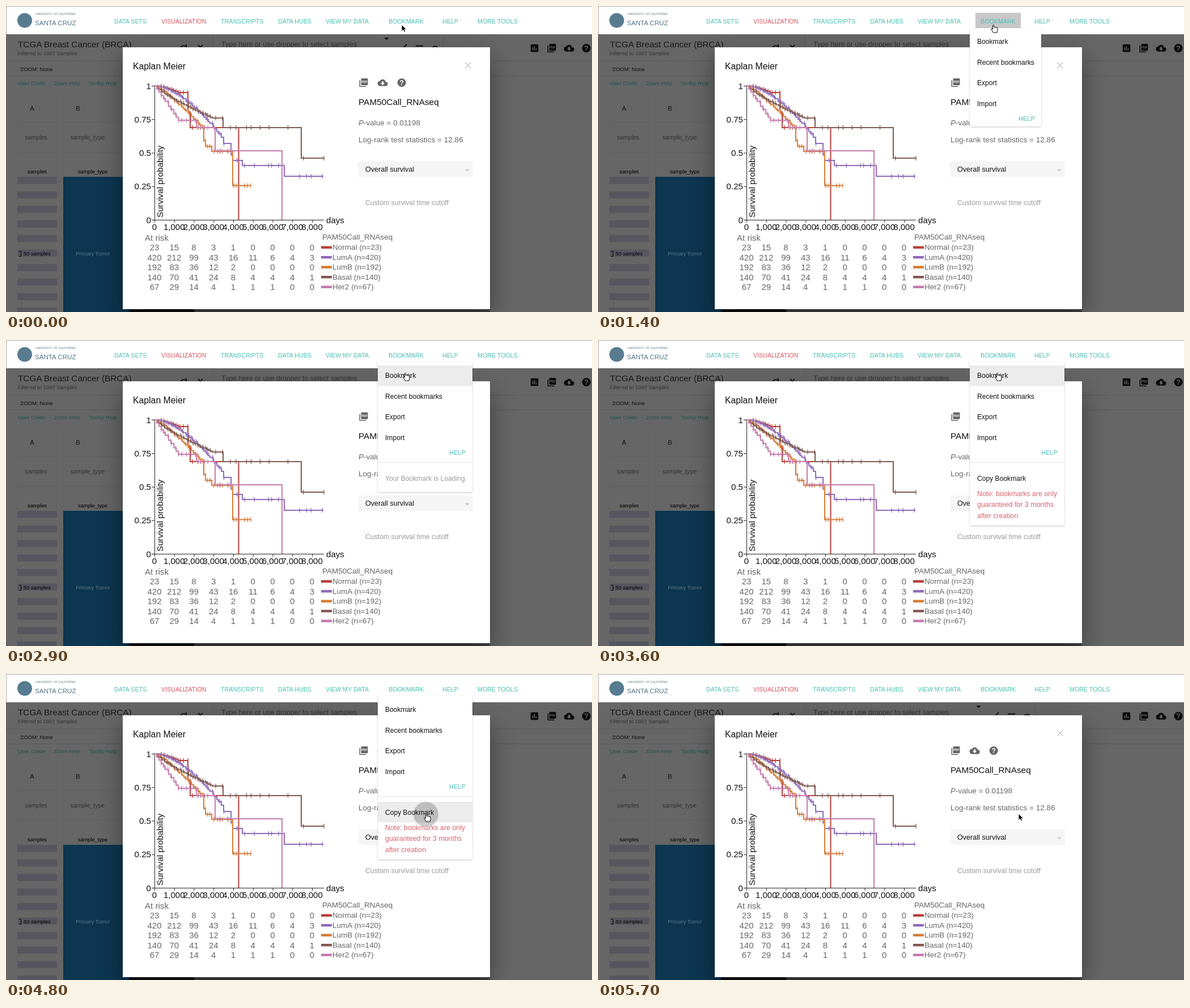
Animation, 1034 px wide and 541 px high, one loop 5800 ms. Source, as an HTML page:

```html
<!DOCTYPE html>
<html lang="en">
<head>
<meta charset="utf-8">
<title>Bookmarking a Kaplan Meier view</title>
<style>
  html, body { margin: 0; width: 100%; height: 100%; overflow: hidden; background: #fff; }
  svg { display: block; width: 1034px; height: 541px; font-family: "Liberation Sans", Arial, sans-serif; }
  #dialog { filter: drop-shadow(0 17px 20px rgba(0, 0, 0, .4)); }
  #panel { filter: drop-shadow(0 1.5px 1.5px rgba(0, 0, 0, .22)); }
</style>
</head>
<body>
<svg viewBox="0 0 1034 541">
  <g id="page"></g>
  <g id="dialog"><rect x="206" y="73" width="648" height="463" fill="#fff"/></g>
  <g id="content"></g>
  <g id="nav"></g>
  <g id="menu">
    <rect id="panel" x="656" y="39" fill="#fff"/>
    <rect id="hover" x="656" height="36.5"/>
    <circle id="ripple" cx="741" cy="248"/>
    <g id="items"></g>
    <g id="loading"></g>
    <g id="copied"></g>
  </g>
  <g id="cursor" stroke-linejoin="round">
    <path id="arrow" d="M0 0V11.5L2.7 9 4.5 13 6.7 12 4.9 8.2H8.5Z" stroke="#fff" stroke-width=".9"/>
    <path id="hand" d="M-1.5 7V1Q-.5-1 .6 1V4.4Q2 3 2.9 4.8 4 3.700 5 5.300 7 4.500 7 6.500V9.500L6 14H-.6L-4.400 7.600Q-3.500 5.800-1.500 8.200Z" fill="#fff" stroke="#000"/>
  </g>
</svg>
<script>
const $ = id => document.getElementById(id);
const TEAL = '#4bbfb3', RED = '#d25560', GRAY = '#666', DIMMED = '#666';

const range = n => [...Array(n).keys()];
const text = (x, y, str, size, fill = '#111', extra = '') =>
  `<text x="${x}" y="${y}" font-size="${size}" fill="${fill}" ${extra}>${str}</text>`;
const middle = 'text-anchor="middle"';
const rect = (x, y, w, h, fill, extra = '') =>
  `<rect x="${x}" y="${y}" width="${w}" height="${h}" fill="${fill}" ${extra}/>`;
const circle = (cx, cy, r, fill) => `<circle cx="${cx}" cy="${cy}" r="${r}" fill="${fill}"/>`;
const line = (d, stroke, width = 1) => `<path d="${d}" fill="none" stroke="${stroke}" stroke-width="${width}"/>`;

// Icons on a 24 unit grid
const icons = {
  bars: (ink, back) => rect(3, 3, 18, 18, ink, 'rx="2"') + line('M8 17V10M12 17V7M16 17V13', back, 2),
  pdf: (ink, back) => rect(6, 2, 16, 16, ink, 'rx="2"') + line('M3 6V21H18', ink, 2) +
    text(14, 12.5, 'PDF', 7, back, 'text-anchor="middle" font-weight="bold"'),
  cloud: (ink, back) => circle(6, 14, 6, ink) + circle(12, 11, 7, ink) + circle(19, 15, 5, ink) +
    rect(6, 13, 13, 7, ink) + `<path d="M10 9h4v4h3l-5 5-5-5h3z" fill="${back}"/>`,
  help: (ink, back) => circle(12, 12, 10, ink) + text(12, 17.5, '?', 16, back, 'text-anchor="middle" font-weight="bold"'),
};
const icon = (name, cx, cy, ink, back, size = 18) =>
  `<g transform="translate(${cx - size / 2} ${cy - size / 2}) scale(${size / 24})">${icons[name](ink, back)}</g>`;

function drawPage() {
  const link = '#1e5550', dim = '#333', rule = '#5a5a5a';
  const columnText = (x, label, field) => text(x, 235.5, field, 10.7, dim, middle);
  return rect(0, 50, 1034, 491, DIMMED) +
    line('M0 97.5H1034M0 123.5H1034M365.5 52V80M771.5 52V80', rule) +
    text(21, 73, 'TCGA Breast Cancer (BRCA)', 15.3, '#1a1a1a') +
    text(21, 87, 'Filtered to 1097 Samples', 9.45, dim) +
    text(380, 72, 'Type here or use dropper to select samples', 12.45, dim) +
    '<path d="M667.500 56h8l-4 4z"/>' +
    line('M308 74A6 6 0 0 1 317 71M318 68V73M339 69L343 73L347 69M702 73L707 68M723 70.5H736M752 74A6 6 0 0 1 762 74', '#111', 1.8) +
    ['bars', 'pdf', 'cloud', 'help'].map((name, i) => icon(name, 932.5 + i * 30.5, 74.5, '#0a0a0a', DIMMED)).join('') +
    text(25, 115, 'ZOOM: None', 9.7) +
    text(21, 139.5, 'User Guide', 9.5, link) + text(75, 139.5, '·', 9.5, link) +
    text(84, 139.5, 'Zoom Help', 9.5, link) + text(137, 139.5, '·', 9.5, link) +
    text(146, 139.5, 'Tooltip Help', 9.5, link) +
    line('M20.5 161V302M89.5 161V302M101.5 161V302M20 205.5H90M101 205.5H206M20 258.5H90M101 258.5H206', '#606060') +
    text(46, 185, 'A', 11, '#111', middle) + text(127, 185, 'B', 11, '#111', middle) +
    text(53, 235.5, 'samples', 10.7, dim, middle) + text(144, 235.5, 'sample_type', 10.7, dim, middle) +
    text(55, 296, 'samples', 9.2, '#000', middle) + text(153, 296, 'sample_type', 9.2, '#000', middle) +
    range(10).map(i => rect(20, 302 + i * 25.7, 70, 12.5, '#57565f')).join('') +
    text(31, 441, '50 samples', 9.3, '#000') + line('M23 433.5H26.5V442.5H23', '#000') +
    rect(101, 302, 116, 239, '#0d3650') + rect(217, 534, 115, 7, '#111') + rect(332, 534, 522, 7, '#444') +
    text(153.5, 440.5, 'Primary Tumor', 9.2, '#607884', middle);
}

function drawNav() {
  const tabs = { 'DATA SETS': 191, VISUALIZATION: 274, TRANSCRIPTS: 379, 'DATA HUBS': 480,
    'VIEW MY DATA': 564, BOOKMARK: 675, HELP: 770, 'MORE TOOLS': 832 };
  return rect(0, 0, 1034, 50, '#fff') + line('M0 .5H1034M.5 0V50', '#aaa') +
    circle(33, 25.5, 13, '#587b90') +
    text(52, 15.5, 'UNIVERSITY OF CALIFORNIA', 5.1, '#587b90') +
    text(51, 34, 'SANTA CRUZ', 11.6, '#4f7285') +
    rect(666, 12, 80, 27, 'none', 'id="button"') +
    Object.entries(tabs).map(([name, x]) =>
      text(x, 30.5, name, 10.7, name === 'VISUALIZATION' ? RED : TEAL)).join('');
}

// A curve bends down to its knee in random stairs, then follows the long steps of its tail.
const curves = [
  { name: 'Normal', color: '#b8403a', risk: '23 15 8 3 1 0 0 0 0', bend: 1.5,
    knee: [304, 153], tail: [[321, 187], [325, 215], [410.5, 378]], lastMark: 350 },
  { name: 'LumA', color: '#8f6bb8', risk: '420 212 99 43 16 11 6 4 3', bend: 1.65,
    knee: [380, 232], tail: [[384, 243], [397, 262], [400, 273], [417, 282], [491, 301], [560, 301]], lastMark: 558 },
  { name: 'LumB', color: '#d97b35', risk: '192 83 36 12 2 0 0 0 0', bend: 1.2,
    knee: [347, 216], tail: [[349, 237], [352, 248], [363, 257], [400, 317.5], [432, 317.5]], lastMark: 432 },
  { name: 'Basal', color: '#805a52', risk: '140 70 41 24 8 4 4 4 1', bend: .8,
    knee: [364, 198], tail: [[383, 215], [521, 269], [561, 269]], lastMark: 561 },
  { name: 'Her2', color: '#c57bac', risk: '67 29 14 4 1 1 1 0 0', bend: 1,
    knee: [304, 202], tail: [[336, 215], [369, 256], [487, 378]], lastMark: 391 },
];

function seededRandom(seed) {
  return () => (seed = (seed * 16807) % 2147483647) / 2147483647;
}

function drawCurve({ color, bend, knee, tail, lastMark }, index) {
  const random = seededRandom(7919 * (index + 3)), x0 = 262, y0 = 141;
  const points = [[x0, y0]];
  for (let x = x0 + 4; x < knee[0]; x += 2 + random() * 4) {
    points.push([x, y0 + (knee[1] - y0) * ((x - x0) / (knee[0] - x0)) ** bend]);
  }
  points.push(knee, ...tail);

  const marks = [lastMark];
  // Censoring marks thin out exponentially with time.
  for (let x = 274; x < lastMark; x += 3 + random() * 5 * Math.exp((x - 300) / 90)) marks.push(x);
  const heightAt = x => points.filter(p => p[0] <= x).pop()[1];
  return line(`M${x0} ${y0}` + points.map(([x, y]) => `H${x}V${y}`).join(''), color, 2) +
    line(marks.map(x => `M${x} ${heightAt(x) - 4}v8`).join(''), color, 1.3);
}

function drawContent() {
  const col = i => 262 + i * 34.75, row = i => 432 + i * 17.5, yPos = v => 378 - v * 237;
  const quarters = range(5).map(i => i / 4);
  const axes = line('M262.5 141V378.5H561' + quarters.map(v => `M257 ${yPos(v) + .5}h5`).join('') +
    range(9).map(i => `M${col(i) + .5} 378v5`).join(''), '#222');
  const legendRow = ({ name, color, risk }, r) => {
    const counts = risk.split(' ');
    return counts.map((n, i) => text(col(i), row(r), n, 15, GRAY, middle)).join('') +
      rect(556, row(r) - 7.5, 19, 4.5, color) + text(576, row(r) - 1, `${name} (n=${counts[0]})`, 13.55, GRAY);
  };
  return text(224, 112, 'Kaplan Meier', 15.8) + line('M810.5 99.5l10 10m0-10l-10 10', '#999') +
    axes + quarters.map(v => text(256, yPos(v) + 5.5, v, 15.1, '#111', 'text-anchor="end"')).join('') +
    range(9).map(i => text(col(i), 395.5, i ? i + ',000' : 0, 15, '#111', middle)).join('') +
    text(565, 383.5, 'days', 15.1) +
    text(0, 0, 'Survival probability', 15.2, '#111', 'transform="translate(277 374) rotate(-90)"') +
    curves.map(drawCurve).join('') +
    text(245, 414.5, 'At risk', 15.1, GRAY) + text(558, 413, 'PAM50Call_RNAseq', 13.5, GRAY) +
    curves.map(legendRow).join('') +
    ['pdf', 'cloud', 'help'].map((name, i) => icon(name, 631 + i * 33.6, 135.5, GRAY, '#fff')).join('') +
    text(622, 174.5, 'PAM50Call_RNAseq', 15.4) +
    text(622, 210.5, '<tspan font-style="italic">P</tspan>-value = 0.01198', 13.5, GRAY) +
    text(622, 241, 'Log-rank test statistics = 12.86', 13.6, GRAY) +
    rect(622, 275, 202, 27.5, '#f5f5f5') + '<path d="M810 288.500h8l-4 4z" fill="#ccc"/>' +
    text(634, 293, 'Overall survival', 12.6) +
    text(634, 352, 'Custom survival time cutoff', 12.25, '#999');
}

const ROW = 36.5, FIRST_ROW = 45, COPY_ROW = 226;
const divider = line('M656 216.5H823', '#e4e4e4');
$('page').innerHTML = drawPage();
$('nav').innerHTML = drawNav();
$('content').innerHTML = drawContent();
$('items').innerHTML = ['Bookmark', 'Recent bookmarks', 'Export', 'Import']
  .map((name, i) => text(669, 67.3 + i * ROW, name, 12.1)).join('') +
  text(0, 203, 'HELP', 11, TEAL, 'id="menuHelp"');
$('loading').innerHTML = divider + text(669, 248.5, 'Your Bookmark is Loading', 12.1, '#999');
$('copied').innerHTML = divider + text(669, 248.5, 'Copy Bookmark', 12.1) +
  ['Note: bookmarks are only', 'guaranteed for 3 months', 'after creation']
    .map((s, i) => text(669, 276 + i * 19.4, s, 12.4, '#d9636b')).join('');

const LOOP = 5800, STEP = 100;
const progress = (t, from, to) => Math.min(1, Math.max(0, (t - from) / (to - from)));
const within = (t, from, to) => t >= from && t < to;
const set = (id, attrs) => Object.entries(attrs).forEach(([key, value]) => $(id).setAttribute(key, value));
const show = (id, visible) => set(id, { display: visible ? 'inline' : 'none' });

// From the nav button to the first menu row, then in an arc down to the copy row
function cursorAt(t) {
  const toRow = progress(t, 1500, 1800), toCopy = progress(t, 3700, 4500);
  const easeOut = k => 1 - (1 - k) ** 3, easeInOut = k => k * k * (3 - 2 * k);
  return [698 + 7 * easeOut(toRow) + 37 * easeOut(toCopy), 33 + 25 * easeInOut(toRow) + 189 * easeInOut(toCopy)];
}

function hoveredRowTop(y) {
  if (y >= COPY_ROW) return COPY_ROW;
  const index = Math.floor((y - FIRST_ROW) / ROW);
  return index >= 0 && index < 4 ? FIRST_ROW + index * ROW : null;
}

function render(t) {
  const wide = t >= 2300, copied = t >= 3200, width = wide ? 167 : 126;
  const opacity = progress(t, 800, 1100) * (1 - progress(t, 5000, 5300));
  show('menu', opacity > 0);
  set('menu', { opacity });
  set('panel', { width, height: copied ? 289 : wide ? 230 : 174 });
  set('menuHelp', { x: wide ? 782 : 742 });
  show('loading', wide && !copied);
  show('copied', copied);

  // The highlight trails the pointer slightly.
  const top = hoveredRowTop(cursorAt(t - 150)[1]);
  show('hover', top !== null);
  set('hover', { y: top ?? 0, width, fill: within(t, 1900, 2400) ? '#bdbdbd' : '#ececec' });
  set('ripple', { r: 22 * progress(t, 4500, 4800), opacity: .2 * (1 - progress(t, 4800, 5100)) });
  set('button', { fill: within(t, 200, 700) ? '#ececec' : within(t, 700, 1700) ? '#c8c8c8' : 'none' });

  const hand = within(t, 200, 5200);
  show('hand', hand);
  show('arrow', !hand);
  set('cursor', { transform: `translate(${cursorAt(t)})` });
}

function frame() {
  render(Math.floor(performance.now() % LOOP / STEP) * STEP);
  requestAnimationFrame(frame);
}
frame();
</script>
</body>
</html>
```
